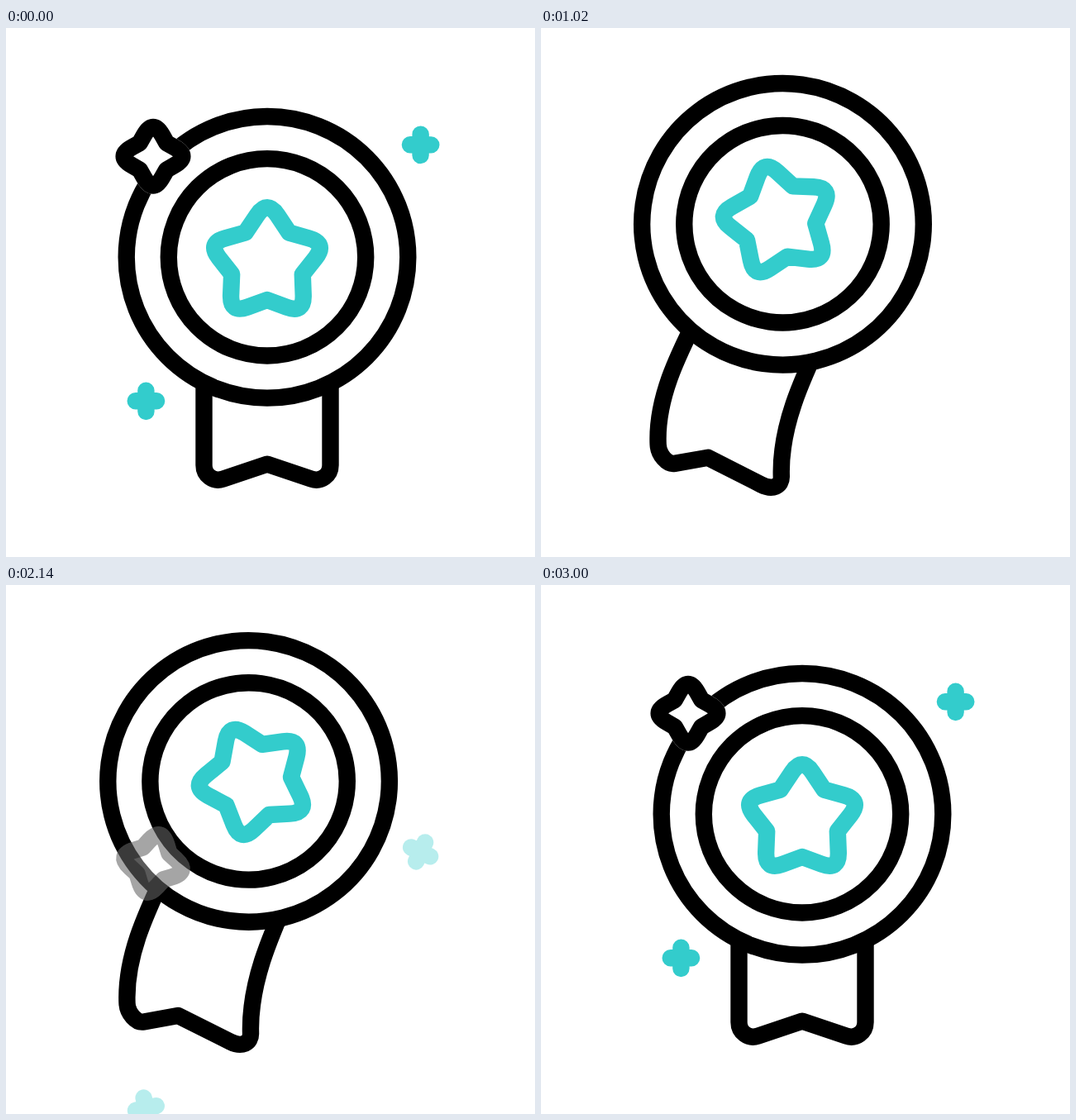
Animation, 640 px wide and 640 px high, one loop 3020 ms. Source, as an HTML page:

```html
<!DOCTYPE html>
<html lang="en">
<head>
<meta charset="utf-8">
<title>Award badge</title>
<style>
  html, body { margin: 0; width: 100%; height: 100%; overflow: hidden; background: #fff; }
  svg { display: block; width: 100vw; height: 100vh; }
  path, circle { fill: none; stroke: #000; stroke-width: 20.4; stroke-linecap: round; stroke-linejoin: round; }
  .teal { stroke: #3cc; }
  .disc { fill: #fff; }
  .back { fill: #fff; stroke: #fff; }
</style>
</head>
<body>
<svg viewBox="0 0 640 640">
  <g id="badge">
    <path id="ribbon"/>
    <circle class="disc" cy="170.3" r="170.3"/>
    <circle cy="170.3" r="119.2"/>
    <path id="star" class="teal"/>
  </g>
  <g id="sparks"></g>
</svg>
<script>
const LOOP = 3020, END = 3000;
const $ = id => document.getElementById(id);

// Eased value between [time, value] keys
function ease(keys, t) {
  const i = keys.findIndex(k => k[0] > t);
  if (i === 0) return keys[0][1];
  if (i < 0) return keys[keys.length - 1][1];
  const [t0, a] = keys[i - 1], [t1, b] = keys[i];
  const u = (t - t0) / (t1 - t0);
  return a + (b - a) * u * u * (3 - 2 * u);
}

// Star outline with rounded tips; round = share of each edge used by the tip
function starPath(n, outer, inner, round) {
  const at = (r, k) => [r * Math.sin(k * Math.PI / n), -r * Math.cos(k * Math.PI / n)];
  const mix = (p, q) => p.map((v, i) => v + (q[i] - v) * round);
  let d = "";
  for (let k = 0; k < 2 * n; k += 2) {
    const tip = at(outer, k), before = at(inner, k - 1), after = at(inner, k + 1);
    d += `${k ? "L" : "M"}${mix(tip, before)}Q${tip} ${mix(tip, after)}L${after}`;
  }
  return d + "Z";
}

// Ribbon in badge space: b = sideways bend, drop = extra length
function ribbonPath(b, drop) {
  const notch = [1.4 * b, 420.6 + drop];
  const side = s => {
    const x = s * 76.5, y = 422 + drop - s * .24 * b;
    const edge = [s * 53.5 + b, 438.6 + drop - s * .15 * b];
    const pull = edge.map((v, i) => v - .22 * (notch[i] - v));
    return {
      top: [x, 264], c1: [x + .57 * b, 264 + (y - 264) / 3],
      c2: [x + 1.33 * b, 264 + (y - 264) * 2 / 3], end: [x + b, y],
      c3: [x + .94 * b, y + 12], pull, edge
    };
  };
  const l = side(-1), r = side(1);
  return `M${l.top}C${l.c1} ${l.c2} ${l.end}C${l.c3} ${l.pull} ${l.edge}L${notch}` +
    `L${r.edge}C${r.pull} ${r.c3} ${r.end}C${r.c2} ${r.c1} ${r.top}`;
}

const plus = "M-12.7 0H12.7M0-12.7V12.7";
const sparks = [
  { x: 178, y: 155.3, turn: 270, d: starPath(4, 45, 23, .67), cls: "" },
  { x: 501.6, y: 141.3, turn: 540, d: plus, cls: "teal" },
  { x: 169.4, y: 451.3, turn: -270, d: plus, cls: "teal" }
];
$("sparks").innerHTML = sparks.map(s =>
  `<g><path class="back" d="${s.d}"/><path class="${s.cls}" d="${s.d}"/></g>`).join("");
$("star").setAttribute("d", starPath(5, 76, 45, .47));

const swing = (left, right) => [[400, 0], [1000, left], [1600, right], [2200, left], [2600, 0]];
const tiltKeys = swing(8, -8), bendKeys = swing(-36.3, 50.7);
const riseKeys = [[0, 0], [400, 1], [2600, 1], [3000, 0]];
const outKeys = [[0, 0], [1000, -204.8]], inKeys = [[2000, 192], [3000, 0]];
const clamp = v => Math.max(0, Math.min(1, v));

function draw(now) {
  const t = Math.min(now % LOOP, END);
  const rise = ease(riseKeys, t);
  $("badge").setAttribute("transform",
    `translate(316 ${107 - 38.4 * rise}) rotate(${ease(tiltKeys, t)})`);
  $("ribbon").setAttribute("d", ribbonPath(ease(bendKeys, t), 42 * rise));
  $("star").setAttribute("transform",
    `translate(0 170.3) rotate(${360 * t / END}) translate(0 6.7)`);

  const leaving = t < 1500;
  const shift = ease(leaving ? outKeys : inKeys, t);
  const alpha = clamp(leaving ? (1000 - t) / 600 : (t - 2000) / 400);
  sparks.forEach((s, i) => {
    const g = $("sparks").children[i];
    g.setAttribute("transform", `translate(${s.x} ${s.y + shift}) rotate(${s.turn * t / END})`);
    for (const p of g.children) p.setAttribute("opacity", alpha);
  });
  requestAnimationFrame(draw);
}
draw(performance.now());
</script>
</body>
</html>
```
